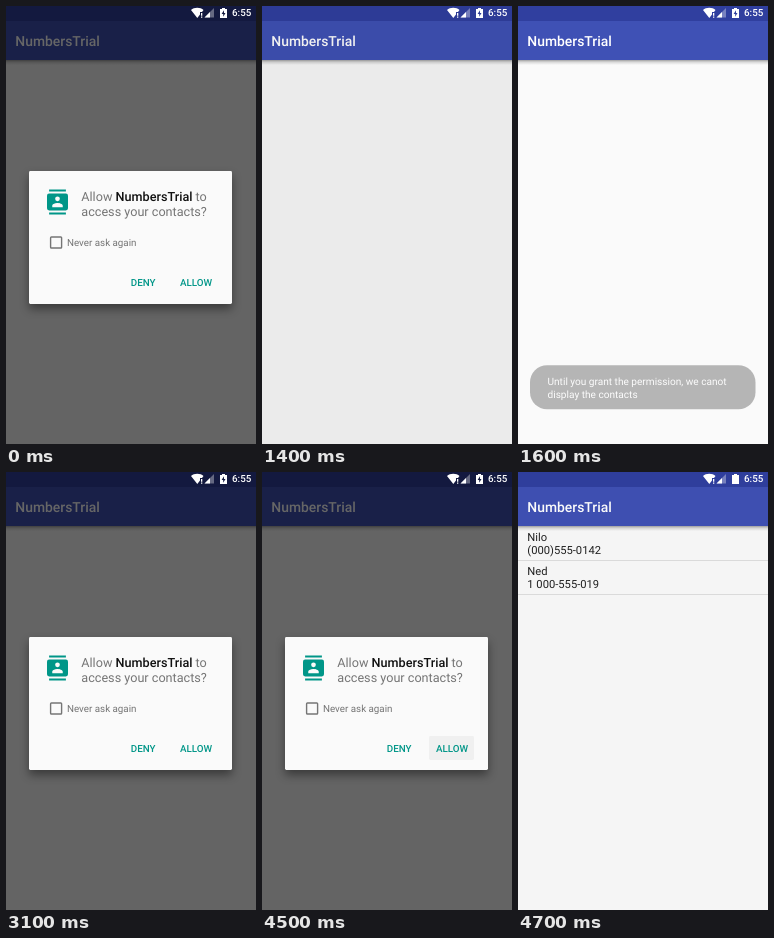
Animation of 250 by 438 pixels, one loop 6200 ms. Source, as an HTML page:

```html
<!DOCTYPE html>
<html lang="en">
<head>
<meta charset="utf-8">
<title>Permission request</title>
<style>
  html, body { margin: 0; width: 100%; height: 100%; overflow: hidden; background: #fafafa; }
  svg { display: block; width: 100%; height: 100%; }
  text { font-family: Roboto, sans-serif; text-rendering: geometricPrecision; white-space: pre; }
  .medium { font-weight: 500; }
  .title { font-size: 13.9px; fill: #fff; }
  .message { font-size: 12.65px; fill: #757575; }
  .small { font-size: 9.8px; }
  .toast { font-size: 10.1px; fill: #fff; }
  .row { font-size: 11.2px; fill: #212121; }
  .teal { fill: #009688; }
  .press { fill: #000; fill-opacity: .04; }
  .card { fill: #fafafa; filter: drop-shadow(0 5px 5px rgba(0, 0, 0, .42)); }
</style>
</head>
<body>
<svg viewBox="0 0 250 438">
  <defs>
    <linearGradient id="shade" x2="0" y2="1">
      <stop stop-opacity=".36"/>
      <stop offset=".4" stop-opacity=".14"/>
      <stop offset="1" stop-opacity="0"/>
    </linearGradient>
  </defs>

  <rect width="250" height="438" fill="#fafafa"/>
  <g id="list">
    <text class="row" x="9.3" y="68.7">Nilo</text>
    <text class="row" x="9.3" y="82">(000)555-0142</text>
    <text class="row" x="9.3" y="103.2">Ned</text>
    <text class="row" x="9.3" y="116.4">1 000-555-019</text>
    <path d="M0 88.5H250M0 122.5H250" stroke="#dedede"/>
  </g>
  <rect y="54" width="250" height="5" fill="url(#shade)"/>
  <rect width="250" height="54" fill="#3f51b5"/>
  <rect width="250" height="15" fill="#303f9f"/>
  <text class="title medium" x="9.3" y="40">NumbersTrial</text>

  <rect id="dim" width="250" height="438"/>

  <g fill="#fff">
    <path d="M185 4C188 1 194.5 1 197.5 4L196 6H194V8.6L191.3 12ZM195 7h1.3v2.8H195ZM195 10.6h1.3v1.2H195Z"/>
    <path d="M208 2V11.5H198.5Z" fill-opacity=".35"/>
    <path d="M204 6V11.5H198.5Z"/>
    <path id="battery" fill-rule="evenodd"/>
    <text class="small medium" x="226" y="10.4">6:55</text>
  </g>

  <g id="dialog">
    <rect class="card" x="23" y="165" width="203" height="133" rx="1.4"/>
    <path class="teal" transform="translate(38.9 183.4) scale(1.05)" fill-rule="evenodd"
      d="M4 0H20V2H4ZM4 22H20V24H4ZM4 4H20a2 2 0 0 1 2 2V18a2 2 0 0 1-2 2H4a2 2 0 0 1-2-2V6a2 2 0 0 1 2-2ZM12 6.75a2.25 2.25 0 0 0 0 4.5a2.25 2.25 0 0 0 0-4.5ZM7 17H17V15.5C17 13.83 13.67 13 12 13S7 13.83 7 15.5Z"/>
    <text class="message" x="75.3" y="195.2">Allow <tspan class="medium" fill="#111">NumbersTrial</tspan> to</text>
    <text class="message" x="75.3" y="210.2">access your contacts?</text>
    <rect x="44.6" y="231" width="11" height="11" rx=".8" fill="none" stroke="#757575" stroke-width="1.4"/>
    <text class="small" x="61" y="240.3" fill="#757575">Never ask again</text>
    <rect id="denyPress" class="press" x="117" y="264" width="41" height="24" rx="1.4"/>
    <rect id="allowPress" class="press" x="167" y="264" width="45" height="24" rx="1.4"/>
    <text class="small medium teal" x="124.8" y="279.7">DENY</text>
    <text class="small medium teal" x="174" y="279.7">ALLOW</text>
  </g>

  <g id="toast">
    <rect x="12" y="359.3" width="225.5" height="44" rx="17" fill="#636363"/>
    <text class="toast" x="29.5" y="379">Until you grant the permission, we canot</text>
    <text class="toast" x="29.5" y="391.7">display the contacts</text>
  </g>
</svg>

<script>
  const LOOP = 6200;
  const el = id => document.getElementById(id);
  const open = { dim: .6, dialog: 1 };
  const states = [
    { at: 0, ...open },
    { at: 1300, dim: .42, dialog: .25, drop: 2.7, press: "deny" },
    { at: 1400, dim: .06 },
    { at: 1500, toast: .1 },
    { at: 1600, toast: .45 },
    { at: 1700, toast: .8 },
    { at: 1800, toast: 1 },
    { at: 3100, ...open },
    { at: 4500, ...open, press: "allow" },
    { at: 4600, dim: .36, dialog: .2, drop: 2.8, press: "allow" },
    { at: 4700, dim: .018, list: 1 }
  ];
  const cell = "M216 2H219V3H221V12H214V3H216Z";
  const bolt = "M218 4.2L215.6 8H217.2V10.8L219.5 7H218Z";

  const fade = (id, opacity) => el(id).setAttribute("opacity", opacity);

  function draw(time) {
    const { dim = 0, dialog = 0, drop = 0, toast = 0, list = 0, press } =
      states.findLast(state => state.at <= time);
    fade("dim", dim);
    fade("dialog", dialog);
    fade("toast", toast);
    fade("list", list);
    fade("denyPress", press === "deny" ? 1 : 0);
    fade("allowPress", press === "allow" ? 1 : 0);
    el("dialog").setAttribute("transform", `translate(0 ${drop})`);
    el("battery").setAttribute("d", list ? cell : cell + bolt);
  }

  function tick() {
    draw(performance.now() % LOOP);
    requestAnimationFrame(tick);
  }
  tick();
</script>
</body>
</html>
```
